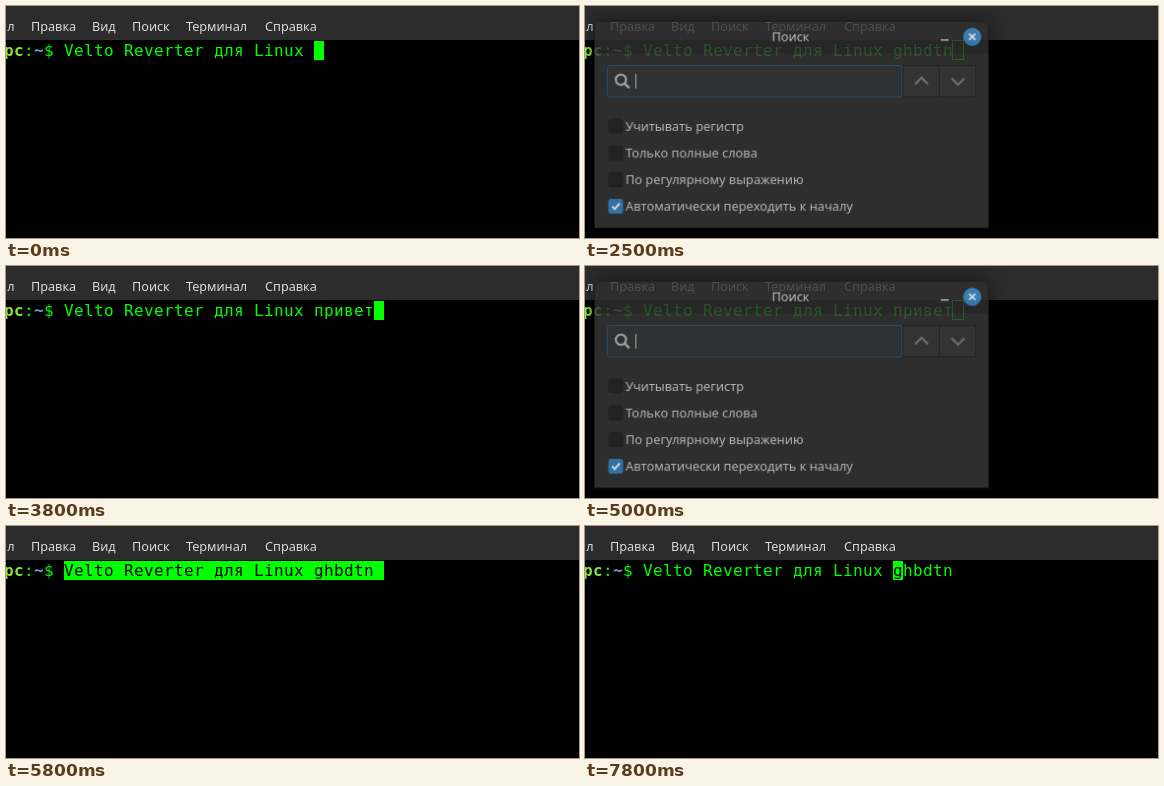
An HTML page with a canvas that plays this animation: 573x232 px, repeating every 8000 ms.

```html
<!DOCTYPE html>
<html lang="ru">
<head>
<meta charset="utf-8">
<title>Терминал</title>
<style>
html, body { margin: 0; width: 100%; height: 100%; overflow: hidden; background: #000; }
canvas { display: block; }
</style>
</head>
<body>
<canvas id="stage" width="573" height="232"></canvas>
<script>
const LOOP = 8000;
const W = 573, H = 232;
const CELL = 10, ROW = 35, ROW_H = 19, PROMPT_X = -2, INPUT_X = 58;
const GREEN = '#00ff00', LIME = '#8ae234', BLUE = '#729fcf';
const ACCENT = '#3f90cf', LIGHT = '#dadada', FIELD = '#3a3c3e';
const MENU_FONT = '12.65px "Noto Sans", sans-serif';
const DIALOG_FONT = '12.78px "Noto Sans", sans-serif';
const MONO = '16px "DejaVu Sans Mono", monospace';
const PHRASE = 'Velto Reverter для Linux ';
const TYPED = 'ghbdtn', FIXED = 'привет';

const stage = document.getElementById('stage').getContext('2d');
const layer = document.createElement('canvas');
layer.width = W;
layer.height = H;
const dlg = layer.getContext('2d');

// Timelines: [start time, value], each value holds until the next one.
const wordTrack = [
  [0, ''], ...[800, 900, 1000, 1100, 1300, 1400].map((t, i) => [t, TYPED.slice(0, i + 1)]),
  [3800, FIXED], [5800, TYPED]
];
// Cursor cell after the phrase; -1 hides it.
const cursorTrack = [
  [0, 0], [600, -1], [800, 1], [900, 2], [1000, 3], [1100, 4], [1300, 5], [1400, 6],
  [2000, -1], [3800, 6], [4100, -1], [4700, 6], [6600, -1],
  [7000, 5], [7200, 4], [7300, 3], [7500, 2], [7700, 1], [7800, 0]
];
const selectTrack = [
  [0, ''], [3000, 'line'], [3400, 'input'], [3800, ''],
  [5600, 'line'], [5800, 'input'], [5900, '']
];
// Dialog window: [opacity, scale]
const windowTrack = [
  [0, null], [2400, [0.45, 0.95]], [2500, [0.83, 0.985]], [2600, [1, 1]],
  [3200, [0.77, 0.968]], [3300, [0.3, 0.945]], [3400, null],
  [5000, [0.83, 0.985]], [5100, [1, 1]],
  [5600, [0.77, 0.968]], [5700, [0.3, 0.945]], [5800, null]
];
const regexTrack = [[0, false], [2700, true], [3400, false], [5200, true], [5800, false]];
const queryTrack = [[0, ''], [2800, '.'], [2900, '.*'], [3400, ''], [5400, '.'], [5500, '.*'], [5800, '']];
const pressTrack = [[0, false], [3100, true], [3400, false], [5600, true], [5800, false]];

function at(track, t) {
  let value = track[0][1];
  for (const [start, next] of track) if (start <= t) value = next;
  return value;
}

function rect(c, x, y, w, h, color) {
  c.fillStyle = color;
  c.fillRect(x, y, w, h);
}

function round(c, x, y, w, h, r, fill, stroke) {
  c.beginPath();
  c.roundRect(x, y, w, h, r);
  if (fill) { c.fillStyle = fill; c.fill(); }
  if (stroke) { c.strokeStyle = stroke; c.lineWidth = 1; c.stroke(); }
}

function line(c, points, color, width) {
  c.beginPath();
  points.forEach(([x, y], i) => i ? c.lineTo(x, y) : c.moveTo(x, y));
  c.strokeStyle = color;
  c.lineWidth = width;
  c.stroke();
}

function label(c, text, x, y, font, color = LIGHT, align = 'left') {
  c.font = font;
  c.textAlign = align;
  c.fillStyle = color;
  c.fillText(text, x, y);
}

function drawMenu() {
  rect(stage, 0, 0, W, 34, '#2c2c2c');
  label(stage, 'Файл', 8.5, 25, MENU_FONT, LIGHT, 'right');
  [['Правка', 25], ['Вид', 86], ['Поиск', 126], ['Терминал', 180], ['Справка', 259]]
    .forEach(([text, x]) => label(stage, text, x, 25, MENU_FONT));
}

function drawCell(ch, x, color, bold, inverse) {
  if (inverse) rect(stage, x, ROW, CELL, ROW_H, color);
  stage.font = (bold ? 'bold ' : '') + MONO;
  stage.textAlign = 'left';
  stage.fillStyle = inverse ? '#000' : color;
  stage.fillText(ch, x, 50);
}

function drawTerminal(t) {
  const selection = at(selectTrack, t);
  const cursor = at(cursorTrack, t);
  const focused = !at(windowTrack, t);
  const text = (PHRASE + at(wordTrack, t)).padEnd(PHRASE.length + TYPED.length + 1);

  [['p', LIME, true], ['c', LIME, true], [':', GREEN], ['~', BLUE, true], ['$', GREEN], [' ', GREEN]]
    .forEach(([ch, color, bold], i) =>
      drawCell(ch, PROMPT_X + i * CELL, color, bold, selection === 'line'));

  [...text].forEach((ch, i) => {
    const onCursor = focused && cursor >= 0 && i === PHRASE.length + cursor;
    drawCell(ch, INPUT_X + i * CELL, GREEN, false, selection !== '' || onCursor);
  });

  if (!focused && !selection) {
    stage.strokeStyle = GREEN;
    stage.lineWidth = 1;
    stage.strokeRect(367.5, ROW - 0.5, CELL + 1, ROW_H);
  }
}

function drawCheck(text, y, checked) {
  round(dlg, 21, y - 7, 14, 14, 2, checked ? '#3a8ac8' : '#2a2a2a', checked ? '#3a8ac8' : '#262626');
  if (checked) line(dlg, [[24.5, y], [27, y + 2.8], [32, y - 3]], '#fff', 2);
  label(dlg, text, 38, y + 4.5, DIALOG_FONT);
}

function drawArrow(x, dir, pressed, enabled) {
  rect(dlg, x, 58, 37, 33, pressed ? '#2d2d2d' : '#3e3e3e');
  dlg.strokeStyle = '#2a2a2a';
  dlg.lineWidth = 1;
  dlg.strokeRect(x + 0.5, 58.5, 37, 32);
  const cx = x + 19.5, cy = 74.5;
  line(dlg, [[cx - 6.5, cy - 3 * dir], [cx, cy + 3.5 * dir], [cx + 6.5, cy - 3 * dir]],
    enabled ? LIGHT : '#868686', 2.2);
}

function drawClear() {
  dlg.beginPath();
  [[295, 74.5], [300, 69], [311, 69], [311, 80], [300, 80]].forEach(([x, y]) => dlg.lineTo(x, y));
  dlg.closePath();
  dlg.fillStyle = '#c4c4c4';
  dlg.fill();
  line(dlg, [[302, 71.8], [307.5, 77.2]], FIELD, 1.6);
  line(dlg, [[307.5, 71.8], [302, 77.2]], FIELD, 1.6);
}

function drawSearchField(query, opening) {
  round(dlg, 19.5, 58.5, 299, 32, [3, 0, 0, 3], FIELD, opening ? '#2f5f83' : '#4189bd');
  dlg.beginPath();
  dlg.arc(33.3, 73, 5.2, 0, 2 * Math.PI);
  dlg.strokeStyle = '#c8c8c8';
  dlg.lineWidth = 2;
  dlg.stroke();
  line(dlg, [[37.1, 76.8], [41.8, 81.5]], '#c8c8c8', 2.4);
  label(dlg, query, 49, 79, DIALOG_FONT, '#c8c8c8');
  const caret = Math.round(48 + dlg.measureText(query).width + (query ? 2 : 0));
  rect(dlg, caret, 67, 1, 15, LIGHT);
  if (query) drawClear();
}

function drawDialog(t, opacity) {
  const query = at(queryTrack, t);
  const opening = opacity < 1 && !query;
  const closing = opacity < 1 && !opening;
  dlg.clearRect(0, 0, W, H);
  dlg.save();
  dlg.shadowColor = 'rgba(0, 0, 0, 0.6)';
  dlg.shadowBlur = closing ? 0 : 22;
  round(dlg, 6, 13, 401, 211, [7, 7, 0, 0], '#383838');
  dlg.restore();
  round(dlg, 6, 13, 401, 33, [7, 7, 0, 0], '#2f2f2f');
  round(dlg, 6.5, 13.5, 400, 210, [7, 7, 0, 0], null, '#1d1d1d');

  label(dlg, 'Поиск', 205.5, 34, DIALOG_FONT, LIGHT, 'center');
  rect(dlg, 358, 32, 8, 1.4, LIGHT);
  dlg.beginPath();
  dlg.arc(390, 29.5, 9.2, 0, 2 * Math.PI);
  dlg.fillStyle = ACCENT;
  dlg.fill();
  line(dlg, [[386.8, 26.3], [393.2, 32.7]], '#fff', 1.7);
  line(dlg, [[393.2, 26.3], [386.8, 32.7]], '#fff', 1.7);

  drawArrow(319, -1, at(pressTrack, t), query);
  drawArrow(356, 1, false, query);
  drawSearchField(query, opening);

  drawCheck('Учитывать регистр', 120, false);
  drawCheck('Только полные слова', 147.5, false);
  drawCheck('По регулярному выражению', 174.5, at(regexTrack, t));
  drawCheck('Автоматически переходить к началу', 201.5, true);
}

function render(t) {
  rect(stage, 0, 0, W, H, '#000');
  drawMenu();
  drawTerminal(t);
  const pose = at(windowTrack, t);
  if (!pose) return;
  const [opacity, scale] = pose;
  drawDialog(t, opacity);
  stage.save();
  stage.globalAlpha = opacity;
  stage.translate(206.5, 118.5);
  stage.scale(scale, scale);
  stage.drawImage(layer, -206.5, -118.5);
  stage.restore();
}

const begin = performance.now();
function tick() {
  render((performance.now() - begin) % LOOP);
  requestAnimationFrame(tick);
}
tick();
</script>
</body>
</html>
```
